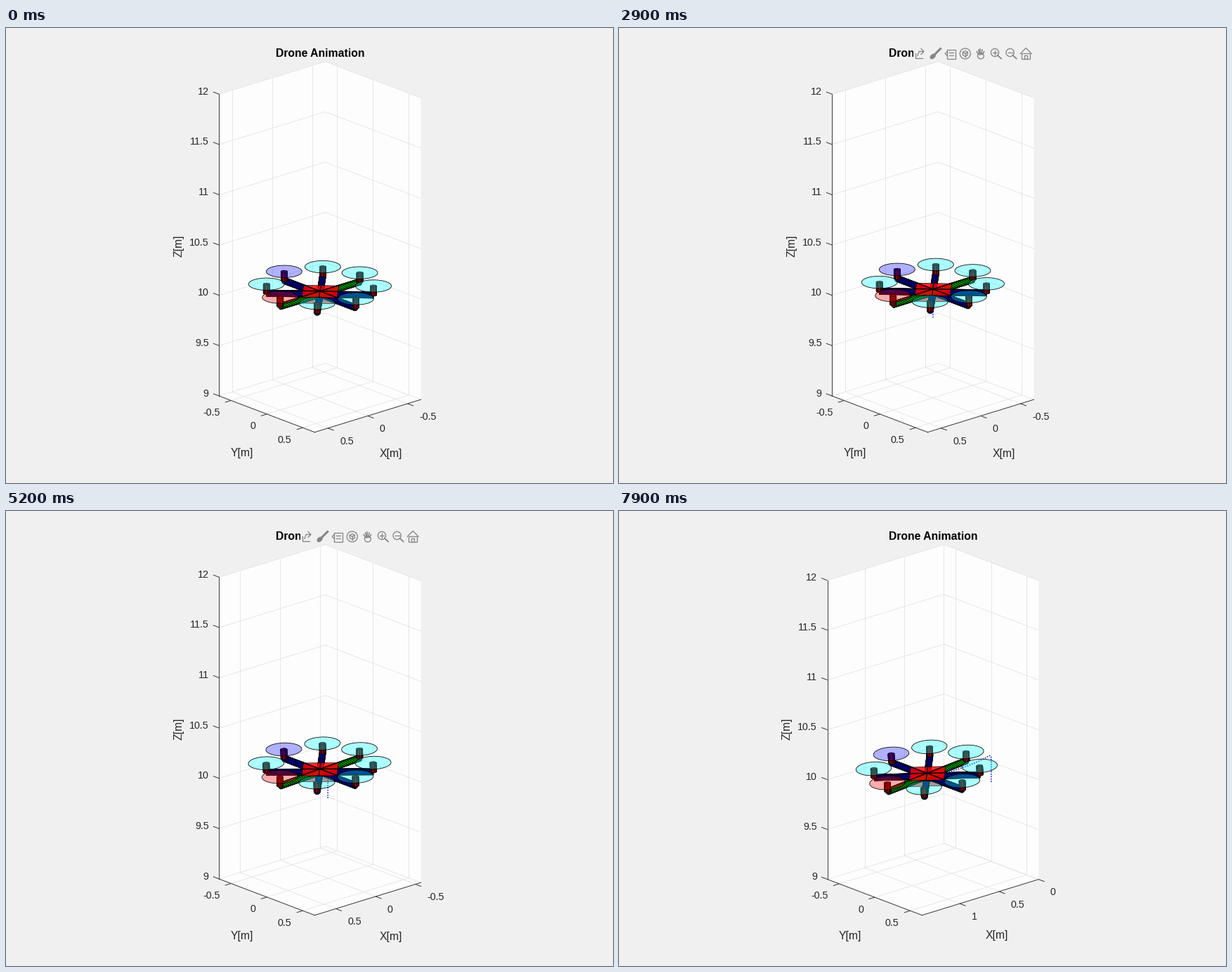
A matplotlib script that plays this animation: 864x648 px, repeating every 8 s.

```python
import numpy as np
import matplotlib.pyplot as plt
from matplotlib.animation import FuncAnimation
from matplotlib.collections import LineCollection, PolyCollection
from matplotlib.patches import Circle, Ellipse, Polygon, Rectangle

plt.rcParams["font.family"] = "Liberation Sans"

W, H = 864, 648
FRAMES, STEP_MS = 80, 100
BG, WALL, GRID, INK, ICON = "#f0f0f0", "#fdfdfe", "#e2e2e7", "#262626", "#858585"
TICK, LABEL = 14.2, 15.7

# Camera: 138 degrees azimuth, 20 degrees elevation
AZ, EL = np.radians(42), np.radians(20)
CA, SA, CE, SE = np.cos(AZ), np.sin(AZ), np.cos(EL), np.sin(EL)
MID = np.array([446.9, 311.7])
VIEW_H = 528

# Drone dimensions in metres
ARM, PROP, THICK, BODY = 0.5, 0.167, 0.06, 0.232
TOP = 0.12
SPAN = ARM + PROP
Z0, Z1 = 9, 12


def altitude(t):
    """Sag from rest, damped rebound and slow return to hover height."""
    ring = np.exp(-.7 * t)
    slow = .067 * (np.exp(-.12 * t) - ring * np.cos(.93 * t))
    sag = .618 * ring * np.sin(.93 * t)
    return 10 + (1 - np.exp(-4 * t)) * (slow - sag)


# Forward flight: acceleration grows steadily and sets the pitch
T = np.arange(FRAMES) * STEP_MS / 1000
JERK, TAKEOFF = .0316, 2.54
AIR = np.clip(T - TAKEOFF, 0, None)
XS, ZS, TILT = JERK * AIR ** 3 / 6, altitude(T), .4 * JERK * AIR
LOWEST = int(np.argmin(ZS))
TOOLBAR = (1.45, 5.25)

fig = plt.figure(figsize=(W / 72, H / 72), dpi=72, facecolor=BG)
ax = fig.add_axes([0, 0, 1, 1])


def depth(p):
    p = np.asarray(p)
    return CE * (SA * p[..., 0] + CA * p[..., 1]) + SE * p[..., 2]


def projector(x0, x1):
    """Fit the box to the view height and return the 3D to pixel mapping."""
    width = x1 - x0
    s = VIEW_H / (CE * (Z1 - Z0) + SE * (SA * width + CA * 2 * SPAN))
    xm, zm = (x0 + x1) / 2, (Z0 + Z1) / 2

    def project(p):
        p = np.asarray(p, float)
        x, y, z = p[..., 0] - xm, p[..., 1], p[..., 2] - zm
        u = MID[0] + s * (SA * y - CA * x)
        v = MID[1] + s * (SE * (SA * x + CA * y) - CE * z)
        return np.stack([u, v], -1)
    return project


def ticks(lo, hi):
    for step in (0.5, 0.2):
        k = np.arange(np.ceil(lo / step - 1e-6), np.floor(hi / step + 1e-6) + 1)
        if len(k) >= 3:
            break
    return np.round(k * step, 1) + 0.0


def text(x, y, s, size=TICK, ha="center", color=INK, **kw):
    ax.text(x, y + .36 * size, s, fontsize=size, ha=ha, va="baseline",
            color=color, **kw)


def segments(segs, color, lw, z):
    ax.add_collection(LineCollection(segs, colors=color, linewidths=lw, zorder=z))


def draw_axes(proj, x0, x1):
    y0, y1 = -SPAN, SPAN
    xt, yt, zt = ticks(x0, x1), ticks(y0, y1), ticks(Z0, Z1)
    hexagon = [(x1, y0, Z1), (x0, y0, Z1), (x0, y1, Z1),
               (x0, y1, Z0), (x1, y1, Z0), (x1, y0, Z0)]
    ax.add_patch(Polygon(proj(hexagon), fc=WALL, ec="none", zorder=0))

    grid = [[(x, y1, Z0), (x, y0, Z0), (x, y0, Z1)] for x in xt]
    grid += [[(x1, y, Z0), (x0, y, Z0), (x0, y, Z1)] for y in yt]
    grid += [[(x1, y0, z), (x0, y0, z), (x0, y1, z)] for z in zt]
    # two-point pieces, so that upright lines fall on whole pixels
    pieces = [proj(g[i:i + 2]) for g in grid for i in (0, 1)]
    segments(pieces, GRID, .8, 1)

    front, left, right = proj([(x1, y1, Z0), (x1, y0, Z0), (x0, y1, Z0)])
    top = proj((x1, y0, Z1))
    for a, b in ((top, left), (left, front), (front, right)):
        ax.plot(*zip(a, b), color=INK, lw=.9, zorder=2)

    def outward(axis):
        d = proj(axis) - proj((0, 0, 0))
        return 9 * d / np.hypot(*d)

    out_x, out_y = outward((1, 0, 0)), outward((0, 1, 0))
    marks = []

    def tick(p, d, dx, dy, value, ha):
        a = proj(p)
        b = a + d
        marks.append([a, b])
        text(b[0] + dx, b[1] + dy, f"{value:g}", ha=ha, zorder=3)

    for x in xt:
        tick((x, y1, Z0), out_y, 8.3, 14.5, x, "left")
    for y in yt:
        tick((x1, y, Z0), out_x, -7.3, 13.7, y, "right")
    for z in zt:
        tick((x1, y0, z), -out_y, -6.3, -1.3, z, "right")
    segments(marks, INK, .9, 2)

    xm, ym = (front + right) / 2, (front + left) / 2
    text(xm[0] + (33 if xt[0] < 0 else 24), xm[1] + 53.2, "X[m]", LABEL)
    text(ym[0] - 35, ym[1] + 54, "Y[m]", LABEL)
    ax.text(left[0] - 53, MID[1] - 1, "Z[m]", fontsize=LABEL, color=INK,
            rotation=90, rotation_mode="anchor", ha="center", va="baseline")
    text(447.4, 35.3, "Drone Animation", LABEL, color="black", weight="bold")


def tube(p, q, u, v, r=THICK / 2, n=20):
    """Quads of an open cylinder from p to q, far ones first."""
    a = np.linspace(0, 2 * np.pi, n + 1)[:, None]
    ring = r * (np.cos(a) * np.array(u) + np.sin(a) * np.array(v))
    p, q = ring + p, ring + q
    quads = [np.array([p[i], p[i + 1], q[i + 1], q[i]]) for i in range(n)]
    return sorted(quads, key=lambda f: depth(f).mean())


def build_drone():
    dirs = [np.array([np.cos(a), np.sin(a), 0])
            for a in np.arange(8) * np.pi / 4]
    up, mid = np.array([0, 0, 1]), np.array([0, 0, THICK / 2])
    faces = []
    for k in (3, 1, 2, 0):
        d = ARM * dirs[k]
        side = (-dirs[k][1], dirs[k][0], 0)
        color = "#00ff00" if k == 0 else "#0000ff"
        faces += [(f, color) for f in tube(mid - d, mid + d, side, up)]
    order = sorted(range(8), key=lambda k: depth(dirs[k]))
    for k in order:
        base = ARM * dirs[k]
        faces += [(f, "#ff0000") for f in
                  tube(base + mid, base + TOP * up, (1, 0, 0), (0, 1, 0))]
    a = np.linspace(0, 2 * np.pi, 80)
    disc = np.stack([PROP * np.cos(a), PROP * np.sin(a), TOP + 0 * a], -1)
    tint = {0: (1, 0, 0, .32), 6: (0, 0, 1, .3)}
    props = [(disc + ARM * dirs[k], tint.get(k, (0, 1, 1, .32))) for k in order]
    square = BODY * np.array(dirs[::2])
    rays = [np.array([-d, d]) * BODY * (1 if k % 2 == 0 else .707) + THICK * up
            for k, d in enumerate(dirs[:4])]
    return faces, props, square, rays


FACES, PROPS, SQUARE, RAYS = build_drone()


def draw_drone(proj, x, z, tilt):
    c, s = np.cos(tilt), np.sin(tilt)
    turn = np.array([[c, 0, s], [0, 1, 0], [-s, 0, c]])

    def place(p):
        return proj(p @ turn.T + (x, 0, z))

    def polys(items, zorder, lw=.65):
        verts, colors = zip(*items)
        ax.add_collection(PolyCollection([place(v) for v in verts],
                                         facecolors=colors, edgecolors="black",
                                         linewidths=lw, zorder=zorder))

    polys([(SQUARE, (1, 0, 0, .6))], 5)
    polys(FACES, 6)
    polys([(SQUARE + (0, 0, THICK), (1, 0, 0, .82))], 7)
    segments([place(r) for r in RAYS], "black", 1.4, 8)
    polys(PROPS, 9, .8)


def draw_toolbar():
    """Eight evenly spaced icons built from strokes, boxes and ellipses."""
    y = 36.5
    share, brush, tip, turn, hand, plus, minus, home = 428 + 21.6 * np.arange(8)

    def add(shape, fill="none", lw=1.3):
        shape.set(facecolor=fill, edgecolor=ICON, linewidth=lw, zorder=12)
        ax.add_patch(shape)

    def stroke(x, *pts, lw=1.3):
        px, py = np.array(pts).T
        ax.plot(x + px, y + py, color=ICON, lw=lw, zorder=12)

    ax.add_patch(Rectangle((418.5, 26), 173, 21, fc=BG, ec="none", zorder=11))

    stroke(share, (-6, -1), (-6, 6), (4, 6))
    stroke(share, (-3, 3), (-1, -3), (5, -3))
    stroke(share, (2, -7), (6, -3), (2, 1))

    stroke(brush, (8, -7), (0, 1), lw=3)
    add(Ellipse((brush - 3, y + 4), 8, 5, angle=-40), ICON)

    add(Rectangle((tip - 4, y - 6), 12, 13))
    stroke(tip, (-4, -3), (-7, 0), (-4, 3))
    for dy in (-2, 2):
        stroke(tip, (-1, dy), (5, dy))

    a = np.pi / 6 + np.arange(6) * np.pi / 3
    cube = 4 * np.stack([np.cos(a), np.sin(a)], -1)
    add(Circle((turn, y), 7.5))
    add(Polygon(cube + (turn, y)))
    for corner in cube[1::2]:
        stroke(turn, (0, 0), corner)

    add(Ellipse((hand + .5, y + 3.5), 9, 8))
    for k in range(-2, 3):
        stroke(hand, (1.4 * k, 1), (2.6 * k, abs(k) ** 1.5 * 1.5 - 7), lw=1.6)

    for x in (plus, minus):
        add(Circle((x - 1, y - 1.5), 5.6))
        stroke(x, (3, 2.5), (8, 7), lw=1.8)
        stroke(x, (-4, -1.5), (2, -1.5))
    stroke(plus, (-1, -4.5), (-1, 1.5))

    stroke(home, (-8, 0), (0, -8), (8, 0))
    add(Rectangle((home - 6, y - 1), 12, 8))
    add(Rectangle((home - 2, y + 2), 4, 5))


def draw(n):
    ax.clear()
    ax.axis("off")
    x, z = XS[n], ZS[n]
    x0, x1 = min(0, x - SPAN), x + SPAN
    proj = projector(x0, x1)
    draw_axes(proj, x0, x1)
    start = LOWEST if n > LOWEST else 0
    path = np.stack([XS, 0 * XS, ZS], -1)[start:n + 1]
    ax.plot(*proj(path).T, color="#0000ff", lw=1.5, ls=(0, (1, 1.3)), zorder=4)
    draw_drone(proj, x, z, TILT[n])
    if TOOLBAR[0] < T[n] < TOOLBAR[1]:
        draw_toolbar()
    ax.set(xlim=(0, W), ylim=(H, 0))


anim = FuncAnimation(fig, draw, frames=FRAMES, interval=STEP_MS, repeat=True)
plt.show()
```
